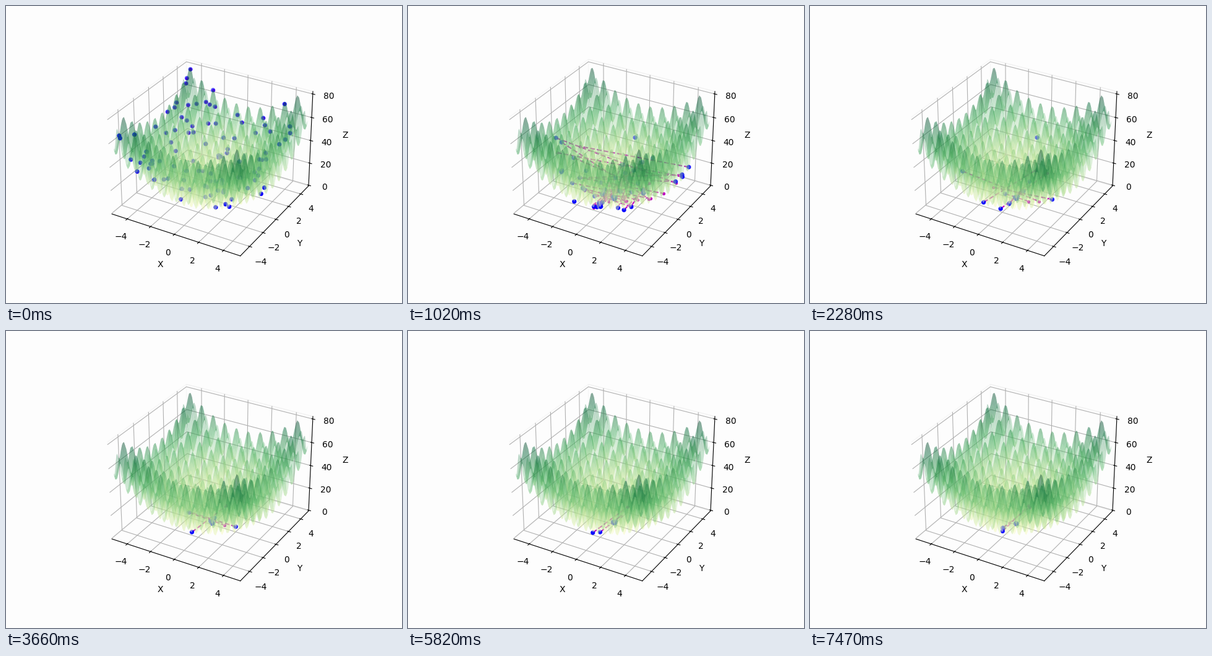
A matplotlib script for the animation above (7.5 s loop, 640 px wide and 480 px high).

```python
import numpy as np
import matplotlib.pyplot as plt
from matplotlib.animation import FuncAnimation
from matplotlib.collections import LineCollection
from mpl_toolkits.mplot3d import proj3d

W, H, DPI = 640, 480, 100
FRAMES, INTERVAL = 250, 30
BOUND = 5.12
POP = 100
PAPER = "#fdfdfd"


def rastrigin(x, y):
    return 20 + x**2 + y**2 - 10 * (np.cos(2 * np.pi * x) + np.cos(2 * np.pi * y))


def padded(low, high):
    pad = (high - low) / 48
    return low - pad, high + pad


# Static scene: axes below the search, translucent surface above it
fig = plt.figure(figsize=(W / DPI, H / DPI), dpi=DPI, facecolor=PAPER)
ax = fig.add_subplot(projection="3d", facecolor=PAPER)
grid = np.linspace(-BOUND, BOUND, 100)
X, Y = np.meshgrid(grid, grid)
Z = rastrigin(X, Y)
surface = ax.plot_surface(X, Y, Z, rstride=1, cstride=1, cmap="YlGn", alpha=0.28)
side = padded(-BOUND, BOUND)
ax.set(xlabel="X", ylabel="Y", zlabel="Z",
       xticks=range(-4, 5, 2), yticks=range(-4, 5, 2), zticks=range(0, 81, 20))
ax.set(xlim=side, ylim=side, zlim=padded(Z.min(), Z.max()))
for axis in (ax.xaxis, ax.yaxis, ax.zaxis):
    axis.pane.fill = False


def snapshot():
    fig.canvas.draw()
    return np.array(fig.canvas.buffer_rgba())


surface.set_visible(False)
backdrop = snapshot()
surface.set_visible(True)
ax.set_axis_off()
ax.patch.set_visible(False)
fig.patch.set_alpha(0)
veil = snapshot()

view = ax.get_proj()
to_screen = ax.transData.frozen()
ax.remove()
fig.patch.set_alpha(1)


def project(p):
    """Lift (n, 2) points onto the surface and return pixel positions."""
    x, y = p.T
    sx, sy, _ = proj3d.proj_transform(x, y, rastrigin(x, y), view)
    return to_screen.transform(np.column_stack([sx, sy]))


def snap(p, rng, jitter=0.04):
    """Pull values into the nearest valley, or onto the bounds."""
    valley = np.round(p) * 0.995 + rng.normal(0, jitter, p.shape)
    return np.where(np.abs(p) > 4.7, np.sign(p) * BOUND, valley)


# Population: each member starts anywhere, settles in a valley, then dies out
seed = np.random.default_rng(12)
start = seed.uniform(-BOUND, BOUND, (POP, 2))
settled = start.copy()
settled[np.arange(POP), seed.integers(0, 2, POP)] *= 0.2
settled = snap(settled, seed)
settle_at = seed.integers(1, 25, POP)
life = 1 + seed.exponential(18, POP)


def mutations(k, rng):
    """Parents and children: one coordinate is thrown across the centre."""
    n = round(1.6 + 85 * np.exp(-k / 35))
    spread = 0.3 + 2.2 * np.exp(-k / 30)
    reach = 2.2 + 2.8 * np.exp(-k / 80)
    jitter = 0.04 + 0.25 * np.exp(-k / 20)
    parent = rng.normal(0, spread, (n, 2))
    i, thrown = np.arange(n), rng.integers(0, 2, n)
    parent[i, thrown] = rng.normal(0, reach, n)
    child = parent * rng.uniform(-0.6, 1, (n, 1))
    child[i, thrown] = -parent[i, thrown] * rng.uniform(0.4, 1.2, n)
    return [snap(np.clip(p, -BOUND, BOUND), rng, jitter) for p in (parent, child)]


def generation(k):
    if k == 0:
        return start, start, np.empty((0, 2, 2))
    rng = np.random.default_rng(1000 + k)
    crowd = np.where((k >= settle_at)[:, None], settled, start)[life > k]
    best = rng.normal(0, 0.05, (4, 2))
    parent, child = mutations(k, rng)
    links = np.stack([project(parent), project(child)], axis=1)
    return np.vstack([crowd, best, parent]), child, links


fig.figimage(backdrop, zorder=-1)
fig.figimage(veil, zorder=5)
layer = fig.add_axes((0, 0, 1, 1))
layer.axis("off")
lines = LineCollection([], colors="m", linewidths=1.5, linestyles="--", zorder=1)
layer.add_collection(lines, autolim=False)
children = layer.scatter([], [], s=14, c="m", linewidths=0, zorder=2)
parents = layer.scatter([], [], s=27, c="b", linewidths=0, zorder=3)
layer.set(xlim=(0, W), ylim=(0, H))


def update(k):
    blue, pink, links = generation(k)
    nearness = blue @ (0.433, -0.75)
    order = np.argsort(nearness)
    shade = np.zeros((len(blue), 4))
    shade[:, 2] = 1
    shade[:, 3] = np.interp(nearness[order], [-4.5, 3.5], [0.65, 1])
    parents.set_offsets(project(blue[order]))
    parents.set_facecolors(shade)
    children.set_offsets(project(pink))
    lines.set_segments(links)
    return lines, children, parents


anim = FuncAnimation(fig, update, frames=FRAMES, interval=INTERVAL,
                     repeat=True, repeat_delay=0)
plt.show()
```
